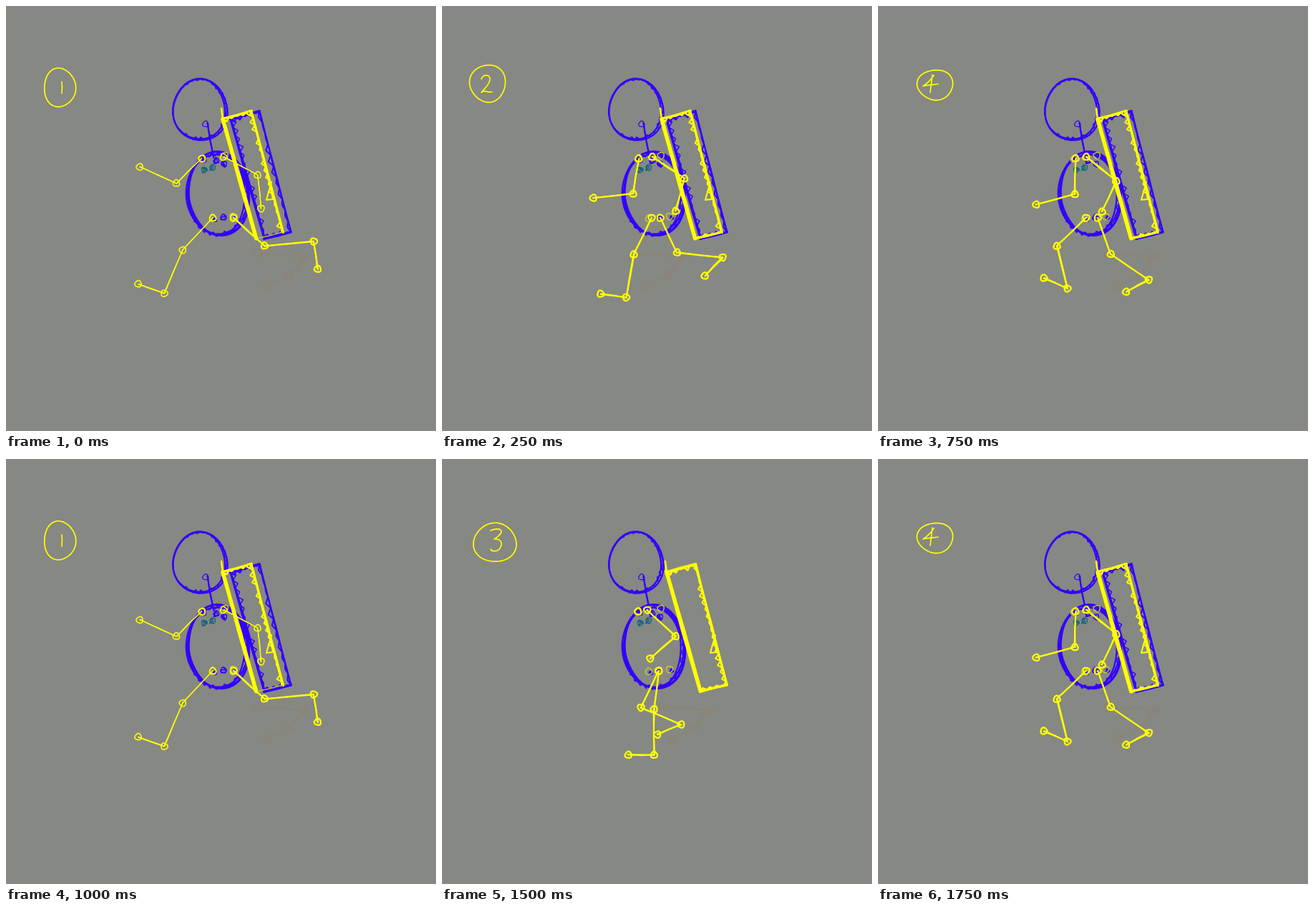
An HTML page with a canvas that plays this animation: 601 px wide and 594 px high, repeating every 2 s.

```html
<!DOCTYPE html>
<html lang="en">
<head>
<meta charset="utf-8">
<title>Run cycle sketch</title>
<style>
html, body { margin: 0; width: 100%; height: 100%; overflow: hidden; background: #868883; }
canvas { display: block; }
</style>
</head>
<body>
<canvas id="stage" width="601" height="594"></canvas>
<script>
const ctx = document.getElementById('stage').getContext('2d');
const PAPER = '#868883', BLUE = '#3300ff', YELLOW = '#ffff00', OLIVE = '#c8cc28', TEAL = '#17657f', SMEAR = '#8a857a';
const STEP = 250, TURN = 2 * Math.PI;
let seed = 1;

// Seeded noise between -a and a.
function rand(a) {
  seed = (seed * 16807) % 2147483647;
  return (seed / 2147483647 * 2 - 1) * a;
}

const mix = (a, b, k) => a.map((v, i) => v + (b[i] - v) * k);

function path(points, color, width) {
  ctx.beginPath();
  points.forEach(p => ctx.lineTo(...p));
  ctx.strokeStyle = color;
  ctx.lineWidth = width;
  ctx.stroke();
}

// A line gone over twice by an unsteady hand.
function sketch(a, b, color, width) {
  const shaky = ([x, y]) => [x + rand(.7), y + rand(.7)];
  for (let i = 0; i < 2; i++) path([a, mix(a, b, .5), b].map(shaky), color, width);
}

// A zigzag along the right-hand side of an edge.
function hatch(a, b, color, width, depth, gap) {
  const dx = b[0] - a[0], dy = b[1] - a[1], len = Math.hypot(dx, dy);
  const n = Math.round(len / gap), points = [];
  for (let i = 0; i <= n; i++) {
    const d = i % 2 ? depth * (.55 + rand(.45)) / len : 0;
    const [x, y] = mix(a, b, i / n);
    points.push([x - dy * d, y + dx * d]);
  }
  path(points, color, width);
}

function oval(x, y, rx, ry, color, width, tilt = 0, wobble = .4) {
  const points = [], phase = rand(3);
  for (let a = -1.7; a < TURN - 1.6; a += .1) {
    const w = wobble * Math.sin(a * 3 + phase);
    const u = (rx + w) * Math.cos(a), v = (ry + w) * Math.sin(a);
    points.push([x + u * Math.cos(tilt) - v * Math.sin(tilt), y + u * Math.sin(tilt) + v * Math.cos(tilt)]);
  }
  path(points, color, width);
}

// An oval drawn in loose passes, with short strokes slipping inside it.
function roughOval(x, y, rx, ry, tilt, passes, width) {
  for (let i = 0; i < passes; i++) {
    oval(x + rand(1.2), y + rand(1), rx - i * 1.6, ry - i * .8, BLUE, width, tilt, 1);
  }
  for (let a = -2.2; a < 2.4; a += .2) {
    const at = (t, k) => [x + rx * k * Math.cos(t), y + ry * k * Math.sin(t)];
    path([at(a, 1), at(a + .14, .93 + rand(.05)), at(a + .24, 1)], BLUE, 1.5);
  }
}

function scribble(x, y, r, color) {
  const points = Array.from({ length: 7 }, () => [x + rand(r), y + rand(r)]);
  path(points, color, 1.5);
  oval(x, y, r * .8, r * .8, color, 1.5);
}

function chain(root, lengths, angles) {
  const points = [root];
  angles.forEach((deg, i) => {
    const [x, y] = points[i], a = deg * TURN / 360;
    points.push([x + lengths[i] * Math.cos(a), y + lengths[i] * Math.sin(a)]);
  });
  return points;
}

function limb(points, width, color) {
  points.slice(1).forEach((p, i) => sketch(points[i], p, color, width));
  points.forEach(([x, y]) => oval(x, y, 4.5, 4.5, color, width + .3));
}

const corners = [[314, 158], [354, 147], [398, 316], [361, 325]];

function drawPack(color, faintBase) {
  const [a, b, c, d] = corners;
  const blue = color === BLUE;
  sketch(a, d, color, blue ? 3 : 5);
  hatch(a, d, color, 1.5, blue ? -7 : 2, 6);
  sketch(a, b, color, 3);
  hatch(a, b, color, 2.5, 6, 4);
  sketch(b, c, color, blue ? 2 : 3);
  hatch(b, c, color, 2, 6, blue ? 8 : 5);
  sketch(c, d, faintBase ? OLIVE : color, faintBase ? 1 : 3);
  if (!faintBase) hatch(c, d, color, 2.5, 5, 5);
  if (!blue) {
    path([[312, 143], a], color, 2.5);
    path([[382, 246], [375, 271], [384, 270], [380, 250]], color, 2);
  }
}

function drawFigure() {
  roughOval(271, 145, 38, 43, -.04, 2, 2.2);
  oval(279, 165, 4, 4, BLUE, 1.2);
  sketch([281, 163], [290, 212], BLUE, 2);
  roughOval(296, 263, 44, 59, -.09, 4, 2.2);

  [[277, 229], [289, 226]].forEach(([x, y]) => scribble(x, y, 4.5, TEAL));
  [[294, 216], [305, 221], [304, 295]].forEach(([x, y]) => scribble(x, y, 4.5, BLUE));
  [[274, 214], [306, 209], [289, 297], [318, 294]].forEach(([x, y]) => {
    scribble(x + 3, y + 2, 3, BLUE);
    oval(x, y, 4.5, 4.5, OLIVE, 1.5);
  });
}

// The rig, from the far arm to the near leg: bone lengths in each limb.
const bones = [[50, 56], [54, 47], [57, 61, 36], [54, 64, 36]];
const rootY = [213, 211, 296, 296];

// Per limb, the root's x and each bone's angle in degrees.
const poses = [
  { badge: [75, 114, 22, 27], pack: -11, smear: 352, stride: 1.08, fine: 3,
    rig: [[274, 136, 204], [304, 28, 84], [289, 133, 113, 200], [318, 42, -5, 82]] },
  { badge: [64, 108, 25, 26], pack: -7, smear: 270, stride: 1, fine: 0,
    rig: [[275, 99, 174], [294, 34, 105], [293, 116, 100, 188], [305, 64, 6, 134]] },
  { badge: [74, 117, 30, 27], pack: 0, smear: 308, stride: 1, fine: 0,
    rig: [[274], [287, 43, 139], [303, 116, 23, 157], [303, 97, 90, 180]] },
  { badge: [80, 110, 25, 21], pack: -7, smear: 322, stride: 1, fine: 0,
    rig: [[276, 91, 165], [291, 39, 115], [291, 136, 76, 204], [307, 70, 34, 152]] }
];

const digits = [
  'M3-8Q4 0 3 8',
  'M-9-6C-7-13 4-13 3-5C2 3-6 8-9 13C-4 8 0 14 6 12',
  'M-6-17C0-20 8-20 9-16C9-11 2-7-1-5C7-6 11-1 8 6C5 13-4 13-6 9',
  'M-2-13C-6-7-11-2-17 2C-11 0-2 0 4-1M-4-14L-7 11'
];

function drawBadge(i) {
  const [x, y] = poses[i].badge;
  oval(...poses[i].badge, YELLOW, 1.7, 0, .8);
  ctx.save();
  ctx.translate(x, y);
  ctx.stroke(new Path2D(digits[i]));
  ctx.restore();
}

function drawPose(i) {
  const { pack, smear, stride, fine, rig } = poses[i];
  ctx.lineCap = ctx.lineJoin = 'round';
  ctx.fillStyle = PAPER;
  ctx.fillRect(0, 0, 601, 594);

  seed = 4711;
  limb(chain([smear, 346], [66, 34, 34], [4, 130, 155]), 3, SMEAR);
  drawFigure();
  if (pack) drawPack(BLUE);

  ctx.save();
  ctx.translate(pack, 0);
  drawPack(YELLOW, fine > 0);
  ctx.restore();

  rig.forEach(([x, ...angles], k) => {
    const scale = k > 1 ? stride : 1;
    const points = chain([x, rootY[k]], bones[k].map(n => n * scale), angles);
    limb(points, k < fine ? 1.3 : 2, YELLOW);
  });
  drawBadge(i);
}

let shown = -1;
function tick() {
  const i = Math.floor(performance.now() / STEP) % poses.length;
  if (i !== shown) drawPose(shown = i);
  requestAnimationFrame(tick);
}
tick();
</script>
</body>
</html>
```
